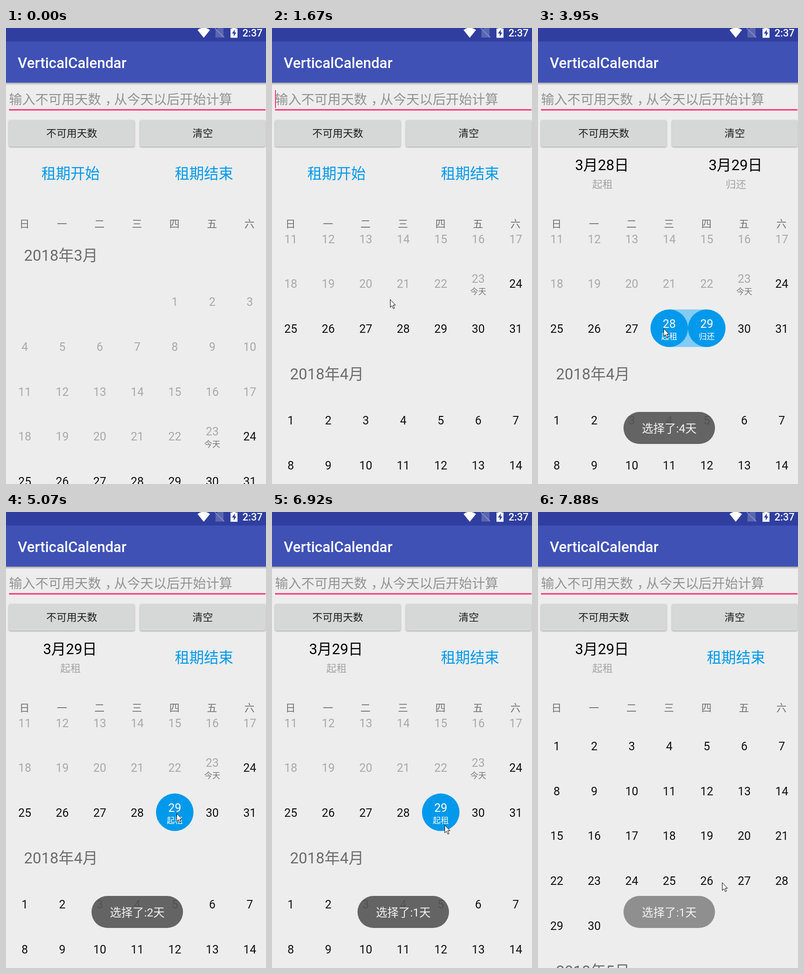
An HTML page with a canvas that plays this animation: 520 px wide and 911 px high, repeating every 8 s.

```html
<!DOCTYPE html>
<html lang="zh-CN">
<head>
<meta charset="utf-8">
<style>
html, body { margin: 0; width: 100%; height: 100%; overflow: hidden; background: #ededed; }
canvas { display: block; }
</style>
</head>
<body>
<canvas id="stage" width="520" height="911"></canvas>
<script>
const c = document.getElementById('stage').getContext('2d');
const LOOP = 8000, START = 310, BLUE = '#0099eb', PINK = '#ff4081', BG = '#ededed';
const ROW = 89.7, COL = 75, LIST_TOP = 409;

// Taps on days of March: [time, day]
const taps = [[1800, 27], [2070, 30], [3280, 29], [3950, 28], [4940, 29], [5780, 29], [6650, 29]];
// Places the pointer reaches: [time, x, y]
const path = [[START, 365, 640], [730, 362, 375], [1800, 192, 600], [2070, 400, 608], [2460, 347, 627],
  [3280, 342, 608], [3950, 251, 600], [4940, 341, 602], [6650, 341, 602], [6920, 345, 625],
  [7500, 370, 866], [7880, 368, 740]];
// First weekday and length of each month
const months = [{ n: 3, first: 4, days: 31 }, { n: 4, first: 0, days: 30 }, { n: 5, first: 2, days: 31 }];

const clamp = v => Math.max(0, Math.min(1, v));
const easeOut = p => 1 - (1 - clamp(p)) ** 2;
const scrollAt = t => 305 * easeOut((t - START) / 640) + 316.5 * easeOut((t - 7580) / 300);

// The first tap opens a range, the second closes it in either direction
function selection(t) {
  let from = 0, to = 0, count = 0;
  for (const [time, day] of taps) {
    if (time > t) break;
    if (from && !to) {
      [from, to] = [Math.min(from, day), Math.max(from, day)];
      count = to - from + 1;
    } else {
      [from, to] = [day, 0];
    }
  }
  return { from, to, count };
}

// The pointer rests, then glides to arrive on time
function pointerAt(t) {
  const j = path.findIndex(k => k[0] > t);
  if (j < 0) return path[path.length - 1].slice(1);
  const [t0, x0, y0] = path[j - 1], [t1, x1, y1] = path[j];
  const p = clamp(1 - (t1 - t) / Math.min(500, t1 - t0));
  return [x0 + (x1 - x0) * p, y0 + (y1 - y0) * p].map(Math.round);
}

// Text is placed by its vertical middle
function text(s, x, y, size, color, align = 'center', weight = 400) {
  c.font = `${weight} ${size}px Roboto, "Noto Sans CJK SC", "Noto Sans CJK", sans-serif`;
  c.textAlign = align;
  c.fillStyle = color;
  c.fillText(s, x, Math.round(y + size * .36));
}

function rect(x, y, w, h, color) {
  c.fillStyle = color;
  c.fillRect(x, y, w, h);
}

function pill(x, y, w, h, r, color) {
  c.fillStyle = color;
  c.beginPath();
  c.roundRect(x, y, w, h, r);
  c.fill();
}

function shape(d, color, x = 0, y = 0, stroke) {
  const p = new Path2D(d);
  c.save();
  c.translate(x, y);
  c.fillStyle = color;
  c.fill(p);
  if (stroke) {
    c.strokeStyle = stroke;
    c.stroke(p);
  }
  c.restore();
}

function bars() {
  const g = c.createLinearGradient(0, 109, 0, 114);
  g.addColorStop(0, 'rgba(0,0,0,.32)');
  g.addColorStop(1, 'rgba(0,0,0,0)');
  rect(0, 109, 520, 5, g);
  rect(0, 0, 520, 27, '#303f9f');
  rect(0, 27, 520, 82, '#3f51b5');
  shape('M395.5 19.5L383 4Q395.5-5 408 4Z', '#fff');
  shape('M424 0H435V19H419V5Z', '#5a66b1');
  shape('M417 1L418.5 0L437 18L435.5 19.5Z', '#8088c4');
  shape('M449 1H453V-1H459V1H463V19.5H449Z', '#fff');
  shape('M457.5 3L452 11H455.5V17L460.5 9H457.5Z', '#303f9f');
  text('2:37', 473, 10, 20.4, '#fff', 'left', 500);
  text('VerticalCalendar', 23.5, 69.5, 29.2, '#fff', 'left', 500);
}

function button(x, label) {
  c.save();
  c.shadowColor = 'rgba(0,0,0,.35)';
  c.shadowBlur = 3;
  c.shadowOffsetY = 1;
  pill(x, 184, 251, 53, 3, '#d6d7d7');
  c.restore();
  text(label, x + 125.5, 211, 20.4, '#1c1c1c', 'center', 500);
}

function form(t) {
  const hint = (s, x) => text(s, x, 143, 26.3, '#929292', 'left');
  hint('输入不可用天数', 6);
  hint('，', 198);
  hint('从今天以后开始计算', 216);
  rect(6, 162, 513, 3, PINK);
  if ((t + 700) % 1000 < 450) rect(6, 124, 2, 36, PINK);
  button(6, '不可用天数');
  button(268, '清空');
}

function summary(x, day, label, prompt) {
  if (!day) return text(prompt, x, 290.5, 29.2, BLUE);
  text(`3月${day}日`, x - 1, 273, 29.2, '#000');
  text(label, x, 313, 20.4, '#a3a3a3');
}

function dayCell(x, y, month, day, { from, to }) {
  const march = month === 3, today = march && day === 23;
  const edge = march && from && (day === from || day === to);
  const inside = march && day > from && day < to;
  if (edge) pill(x - 37.5, y - 38.5, 75, 75, 37.5, BLUE);
  const color = edge || inside ? '#fff' : march && day < 24 ? '#a9a9a9' : '#111';
  text(day, x, y - (edge || today ? 10.5 : 0), 23.2, color);
  if (today) text('今天', x, y + 15.5, 16, '#757575');
  if (edge) text(from === to ? '一天' : day === from ? '起租' : '归还', x, y + 15.5, 16, '#fff');
}

function calendar(scroll, range) {
  c.save();
  c.beginPath();
  c.rect(0, LIST_TOP, 520, 911 - LIST_TOP);
  c.clip();
  let top = 454 - scroll;
  for (const { n, first, days } of months) {
    text(`2018年${n}月`, 36, top, 30.7, '#6c6c6c', 'left');
    const spot = d => {
      const i = d + first - 1;
      return [37.5 + i % 7 * COL, top + 93 + Math.floor(i / 7) * ROW];
    };
    if (n === 3 && range.to > range.from) {
      const [x, y] = spot(range.from);
      rect(x, y - 38.5, (range.to - range.from) * COL, 75, '#82cbf5');
    }
    for (let d = 1; d <= days; d++) dayCell(...spot(d), n, d, range);
    top = spot(days)[1] + 90.3;
  }
  c.restore();
}

function toast(t) {
  const { count } = selection(t - 130);
  if (!count) return;
  c.save();
  c.globalAlpha = Math.min(clamp((t - 2150) / 200), clamp((8200 - t) / 470));
  pill(171, 767, 183, 64, 32, 'rgba(88,88,88,.92)');
  c.restore();
  text(`选择了:${count}天`, 262.5, 800, 22.8, '#f4f4f4');
}

function draw(t) {
  const range = selection(t);
  rect(0, 0, 520, 911, BG);
  bars();
  form(t);
  summary(129, range.from, '起租', '租期开始');
  summary(396, range.to, '归还', '租期结束');
  [...'日一二三四五六'].forEach((s, i) => text(s, 37 + i * COL, 391.5, 20.4, '#707070'));
  calendar(scrollAt(t), range);
  toast(t);
  if (t >= START) shape('M.5 .5V16L4 12.7L6.6 18.5L9 17.5L6.5 11.7H11Z', '#fff', ...pointerAt(t), '#111');
}

function tick() {
  draw(performance.now() % LOOP);
  requestAnimationFrame(tick);
}
tick();
</script>
</body>
</html>
```
